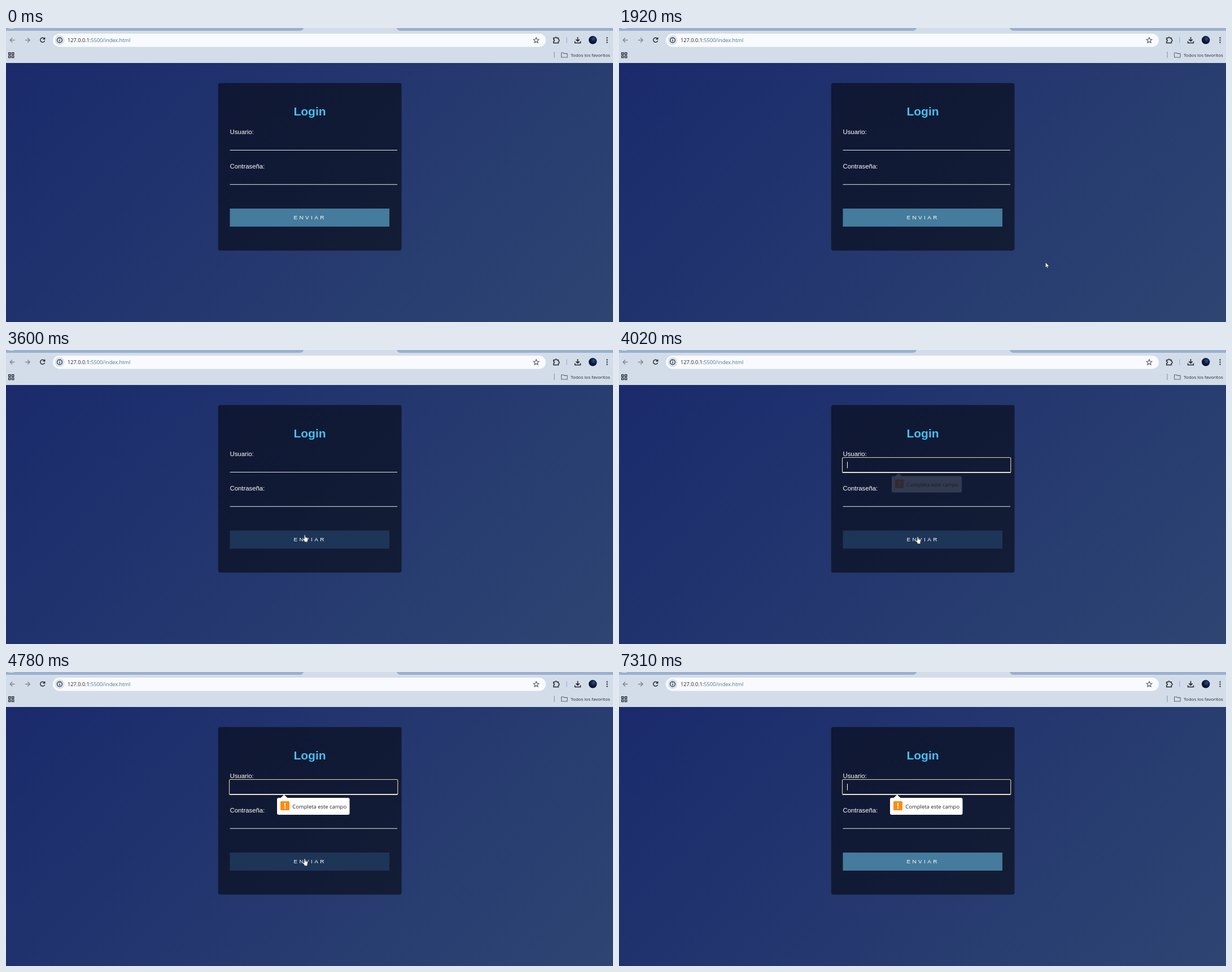
Write an HTML page that moves like this. It is 1075x521 px and loops after 7570 ms.

```html
<!DOCTYPE html>
<html lang="es">
<head>
<meta charset="utf-8">
<title>Login</title>
<style>
html, body { margin: 0; width: 100%; height: 100%; overflow: hidden; background: #1a2a6c; }
svg { display: block; width: 1075px; height: 521px; }
.ui { font-family: "Open Sans", "Noto Sans", sans-serif; }
.form { font-family: "Liberation Sans", Arial, sans-serif; fill: #fff; }
.line { fill: none; stroke: #22272e; stroke-width: 1.4; }
.muted { stroke: #7d8792; }

.pointer, .arrow, .hand, .button, .focus, .caret, .bubble {
  animation: 7570ms linear infinite;
}
.arrow, .hand, .button, .focus, .caret { animation-timing-function: step-end; }
.pointer { animation-name: travel; }
.arrow { animation-name: arrow; }
.hand { animation-name: hand; }
.button { animation-name: hover; }
.focus { animation-name: focus; }
.caret { animation-name: blink; }
.bubble { animation-name: pop; transform-origin: 566px 238px; }

@keyframes travel {
  0% { transform: translate(1033px, 522px); }
  10.04% { transform: translate(1033px, 522px); animation-timing-function: steps(11, start); }
  20.6% { transform: translate(967px, 498px); animation-timing-function: steps(6, start); }
  26.29% { transform: translate(755px, 415px); animation-timing-function: steps(5, start); }
  31.1% { transform: translate(606px, 353px); animation-timing-function: steps(1, start); }
  32.02% { transform: translate(592px, 346px); animation-timing-function: steps(3, start); }
  34.8% { transform: translate(543px, 314px); animation-timing-function: steps(1, start); }
  35.7% { transform: translate(535px, 307px); animation-timing-function: steps(3, start); }
  38.4% { transform: translate(533px, 301px); }
  42% { transform: translate(533px, 301px); animation-timing-function: steps(4, start); }
  45.7% { transform: translate(530px, 318px); animation-timing-function: steps(4, start); }
  49.4% { transform: translate(529px, 331px); }
  71.1% { transform: translate(529px, 331px); animation-timing-function: steps(4, start); }
  74.9% { transform: translate(615.5px, 371px); animation-timing-function: steps(7, start); }
  81.5% { transform: translate(842px, 456px); animation-timing-function: steps(6, start); }
  87%, 100% { transform: translate(1010px, 527px); }
}
@keyframes hover {
  0%, 33.87%, 73%, 100% { fill: #457b9d; }
  31.1%, 45.7% { fill: #1d3557; }
}
@keyframes arrow {
  0%, 33.87%, 73%, 100% { opacity: 1; }
  31.1%, 45.7% { opacity: 0; }
}
@keyframes hand {
  0%, 33.87%, 73%, 100% { opacity: 0; }
  31.1%, 45.7% { opacity: 1; }
}
@keyframes focus {
  0% { opacity: 0; }
  51.2%, 100% { opacity: 1; }
}
@keyframes blink {
  0%, 60.9%, 75.4%, 89.42% { opacity: 0; }
  51.2%, 68.4%, 82.4%, 96.55%, 100% { opacity: 1; }
}
@keyframes pop {
  0%, 52.5% { opacity: 0; transform: scale(.96); }
  56.8%, 100% { opacity: 1; transform: none; }
}
</style>
</head>
<body>
<svg viewBox="0 0 1075 521" xmlns="http://www.w3.org/2000/svg">
  <defs>
    <linearGradient id="sky" gradientUnits="userSpaceOnUse" x1="154" y1="-92" x2="921" y2="675">
      <stop stop-color="#1a2a6c"/>
      <stop offset="1" stop-color="#2e4572"/>
    </linearGradient>
    <radialGradient id="avatar" cx=".6" cy=".35" r=".7">
      <stop stop-color="#28508f"/>
      <stop offset=".5" stop-color="#0d1c42"/>
      <stop offset="1" stop-color="#060a1c"/>
    </radialGradient>
  </defs>

  <!-- Browser bar -->
  <rect width="1075" height="62" fill="#d3dde9"/>
  <path d="M0 0H527Q526 5 520 5H0ZM692 0H1075V5H700Q693 5 692 0Z" fill="#9bb0cf"/>
  <rect x="5" width="9" height="1" fill="#dbe4ef"/>
  <rect x="83" y="10" width="873" height="23.5" rx="11.75" fill="#f8fafd"/>
  <circle cx="95" cy="21.5" r="8.5" fill="#d8e1ec"/>

  <g class="line">
    <path class="muted" d="M15.5 21.5H7.5M11.2 17.5L7.2 21.5L11.2 25.5M34 21.5H42M38.2 17.5L42.2 21.5L38.2 25.5"/>
    <path d="M68 18.8A4 4 0 1 0 68.6 22.5M68.7 16.8V19.8H65.5"/>
    <circle cx="95" cy="21.5" r="4.4" stroke-width="1.2"/>
    <path d="M95 20.9V24M95 18.7V19.9" stroke-width="1.2"/>
    <path d="M939 16.8L940.4 20L943.9 20.3L941.2 22.6L942 26L939 24.2L936 26L936.8 22.6L934.1 20.3L937.6 20Z" stroke="#4c5661" stroke-width="1.1"/>
    <path d="M969.7 17.7H972.4A1.6 1.6 0 0 1 975.6 17.7H978.4V20.4A1.6 1.6 0 0 1 978.4 23.6V26.5H969.7V23.7A1.6 1.6 0 0 0 969.7 20.5Z"/>
    <path d="M1012.5 16V23M1009.3 20.2L1012.5 23.4L1015.7 20.2M1007.6 23.5V26.5H1017.4V23.5" stroke-width="1.6"/>
    <path d="M4.7 43.7H8V47H4.7ZM10.5 43.7H13.8V47H10.5ZM4.7 49.3H8V52.6H4.7ZM10.5 49.3H13.8V52.6H10.5Z" stroke-width="1.3"/>
    <path d="M983.6 44H987.4L988.6 45.4H994V52H983.6Z" stroke="#5d6873" stroke-width="1.1"/>
  </g>
  <path d="M993 16.5V26.5" stroke="#93b4e2" stroke-width="1.2"/>
  <path d="M971 42V53" stroke="#8d9bb0" stroke-width="1.2"/>
  <circle cx="1039.2" cy="21.3" r="7.2" fill="url(#avatar)"/>
  <g fill="#22272e">
    <circle cx="1064.5" cy="17.4" r="1.2"/>
    <circle cx="1064.5" cy="21.4" r="1.2"/>
    <circle cx="1064.5" cy="25.4" r="1.2"/>
  </g>
  <g class="ui" fill="#23272d">
    <text x="109" y="25" font-size="9.2">127.0.0.1:<tspan fill="#4d7593">5500/index.html</tspan></text>
    <text x="1000" y="50.5" font-size="8">Todos los favoritos</text>
  </g>

  <!-- Page -->
  <rect y="62" width="1075" height="459" fill="url(#sky)"/>
  <rect x="375.7" y="97.5" width="324.8" height="297" rx="4" fill="#000" fill-opacity=".52"/>
  <rect class="button" x="396.5" y="320" width="282.5" height="32" fill="#457b9d"/>
  <g class="form" font-size="11.33">
    <text x="538" y="155" font-size="21" font-weight="700" text-anchor="middle" style="fill:#48bfef">Login</text>
    <text x="396.5" y="188">Usuario:</text>
    <text x="396.5" y="248.5">Contraseña:</text>
    <text x="509.5" y="339.3" font-size="9.9" letter-spacing="3.4">ENVIAR</text>
  </g>
  <path d="M396.5 216.5H693M396.5 277.3H693" stroke="#e4e7ee"/>
  <rect class="focus" x="395.5" y="190.5" width="298.3" height="27" rx="2" fill="none" stroke="#e6dcb4" stroke-width="1.1"/>
  <rect class="caret" x="404" y="198" width="1" height="11.5" fill="#fff"/>

  <g class="bubble">
    <path d="M483 223H486.5L492.5 217.5L498.5 223H605.5Q608.5 223 608.5 226V250Q608.5 253 605.5 253H483Q480 253 480 250V226Q480 223 483 223Z" fill="#fff"/>
    <rect x="486" y="229" width="16" height="16" rx="1.5" fill="#ff8c0a"/>
    <path d="M492.8 232H495.2L494.8 238.5H493.2ZM492.9 239.8H495.1V242H492.9Z" fill="#fff"/>
    <text class="ui" x="507.3" y="241.7" font-size="9.45" fill="#22252a">Completa este campo</text>
  </g>

  <g class="pointer" fill="#fff" stroke="#10131c" stroke-width=".6" stroke-linejoin="round">
    <path class="arrow" d="M.3 .3V9.6L2.4 7.7L3.9 11L5.4 10.3L4 7.2H7Z"/>
    <path class="hand" d="M-1 .4Q0 -.8 1 .4V4L4.2 4.7Q5.5 5 5.5 6.3L4.8 10V12.4H-.6V11L-3.4 7.4Q-3.6 6 -2.2 6.2L-1 7.2Z"/>
  </g>
</svg>
</body>
</html>
```
